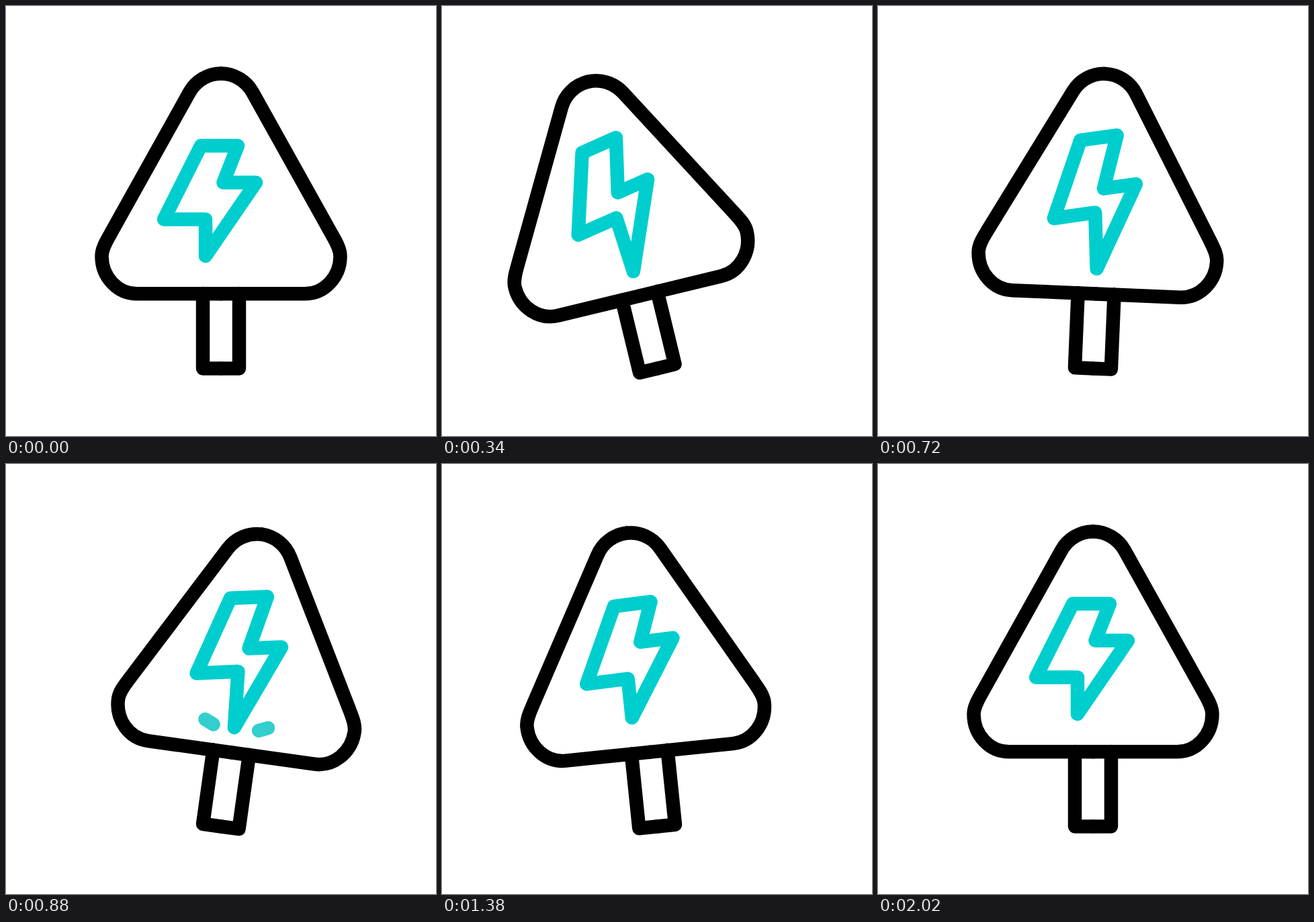
An HTML page for the animation above (2680 ms loop, 640 by 640 pixels).

```html
<!DOCTYPE html>
<html lang="en">
<head>
<meta charset="utf-8">
<title>High voltage sign</title>
<style>
html, body { margin: 0; width: 100%; height: 100%; overflow: hidden; background: #fff; }
svg { display: block; width: 100%; height: 100%; }
path { fill: none; stroke: #000; stroke-width: 20.5; stroke-linecap: round; stroke-linejoin: round; }
#bolt { stroke: #00cece; }
#sparks { stroke: #33cece; }
</style>
</head>
<body>
<svg viewBox="0 0 640 640">
  <g id="sign">
    <path id="half" d="M320 539.5H293V428M320 100.5A54 54 0 0 0 273 128.5L155 340C149 351 142.5 361 142.5 372.5A52.5 56 0 0 0 195 428.3H320"/>
    <use href="#half" transform="matrix(-1 0 0 1 640 0)"/>
    <path id="sparks"/>
    <path id="bolt"/>
  </g>
</svg>
<script>
const STEP = 20, LOOP = 2680;
const $ = id => document.getElementById(id);
const mix = (a, b, k) => a + (b - a) * k;

// Symmetric cubic ease, bezier(pull, 0, 1 - pull, 1), solved by bisection
function ease(u, pull = 0.57) {
  if (u <= 0) return 0;
  if (u >= 1) return 1;
  let lo = 0, hi = 1;
  for (let i = 0; i < 24; i++) {
    const s = (lo + hi) / 2, r = 1 - s;
    const x = 3 * r * r * s * pull + 3 * r * s * s * (1 - pull) + s ** 3;
    if (x < u) lo = s; else hi = s;
  }
  return lo * lo * (3 - 2 * lo);
}
const ramp = (t, from, to) => ease((t - from) / (to - from));

// The sign swings out and settles: [step, degrees]
const swing = [[0, 0], [20, -14], [21.5, -14], [45, 8], [66.7, -6.1], [82, 2.4], [92, -1.1], [101, 0]];

function swingAngle(t) {
  let angle = 0;
  for (let i = 1; i < swing.length; i++) {
    const [from, a] = swing[i - 1], [to, b] = swing[i];
    angle += (b - a) * ramp(t, from, to);
  }
  return angle;
}

// k = 0 at rest, 1 with the point driven down
const boltPath = k =>
  `M290 208h55l${-21.5 - 9 * k} ${54.8 + 21 * k}h48.5l-75 ${109.2 + 7.5 * k}L297 317.5h-62z`;

// Two bursts, each a mirrored pair of dashes that fly out and shrink
function sparkPath(t) {
  let d = "";
  for (const start of [18, 40]) {
    const head = ramp(t, start, start + 9), tail = ramp(t, start + 7, start + 17);
    if (head <= 0 || tail >= 1) continue;
    for (const side of [-1, 1]) {
      const at = k => `${322 + side * mix(34, 69.5, k)} ${mix(390.5, 375, k)}`;
      d += `M${at(tail)}L${at(head)}`;
    }
  }
  return d;
}

function draw(now) {
  const t = Math.floor(now % LOOP / STEP);
  const strike = ramp(t, 0, 17) - ramp(t, 57, 74);
  $("sign").setAttribute("transform", `rotate(${swingAngle(t)} 320 538)`);
  $("bolt").setAttribute("transform", `rotate(${-10.3 * strike} 250 221)`);
  $("bolt").setAttribute("d", boltPath(strike));
  $("sparks").setAttribute("d", sparkPath(t));
}

let begin;
function tick(now) {
  begin ??= now;
  draw(now - begin);
  requestAnimationFrame(tick);
}
draw(0);
requestAnimationFrame(tick);
</script>
</body>
</html>
```
